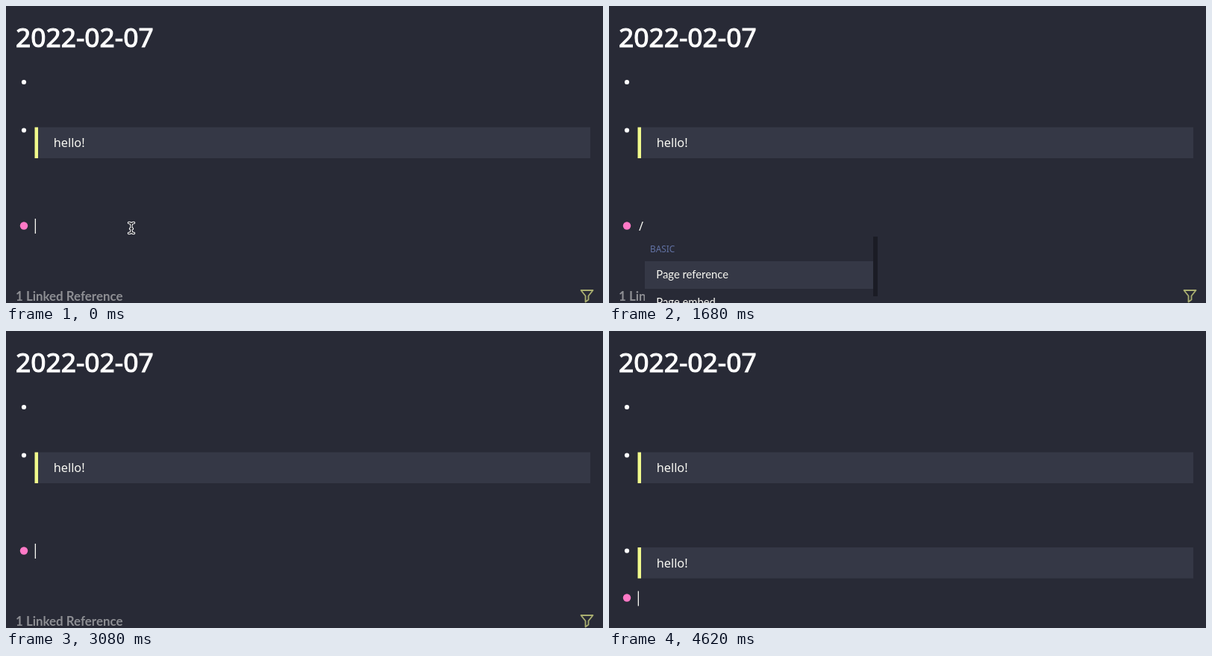
Recreate the animation shown at these times as an HTML page. Size 800 by 398 pixels, loop 4970 ms.

```html
<!DOCTYPE html>
<html lang="en">
<head>
<meta charset="utf-8">
<title>Slash command in an outliner</title>
<style>
html, body { margin: 0; width: 100%; height: 100%; overflow: hidden; background: #282a36; }
svg { display: block; width: 800px; height: 398px; }
text { font: 16.3px "Noto Sans", "Open Sans", sans-serif; fill: #f8f8f2; white-space: pre; }
.title { font-size: 35.4px; fill: #fff; stroke: #fff; stroke-width: 1.1; }
.ref { font: 700 16.9px Lato, sans-serif; fill: #8e8f94; }
.head { font-size: 11.8px; fill: #6272a4; }
.item { font: 14.8px Lato, sans-serif; }
.box { fill: #353846; }
.bullet { fill: #fff; }
</style>
</head>
<body>
<svg viewBox="0 0 800 398">
  <defs>
    <g id="quote">
      <rect class="box" x="39" y="162.500" width="744" height="41.500"/>
      <rect x="38.500" y="162.500" width="4.500" height="41.500" fill="#f1fa8c"/>
      <text x="63.700" y="189">hello!</text>
    </g>
    <path id="beam" d="M164.500 290.500q3.500 0 3.500 3v8q0 3-3.500 3M171.500 290.500q-3.500 0-3.500 3v8q0 3 3.500 3M166.500 298.500h3"/>
  </defs>
  <text class="title" x="13" y="54.700">2022-02-07</text>
  <circle class="bullet" cx="24" cy="102" r="3.1"/>
  <circle class="bullet" cx="24" cy="166.500" r="3.1"/>
  <use href="#quote"/>

  <g id="footer">
    <text class="ref" x="13" y="395">1 Linked Reference</text>
    <path d="M770.500 381h16l-6 7.500v5l-4 3v-8z" fill="none" stroke="#a9ae70" stroke-width="1.8" stroke-linejoin="round"/>
  </g>

  <g id="inserted">
    <use href="#quote" y="127.500"/>
    <circle id="left" class="bullet" cx="24" cy="294.500"/>
  </g>
  <circle id="active" cx="24" fill="#ff79c6"/>
  <text id="typed" x="40" y="301"></text>

  <g id="menu">
    <rect x="48" y="309" width="312" height="89" fill="#282a36"/>
    <rect class="box" x="48" y="342" width="306" height="37"/>
    <rect x="354" y="309" width="6" height="80" fill="#1b1c25"/>
    <text class="head" x="55" y="330">BASIC</text>
    <text class="item" x="63.300" y="365">Page reference</text>
    <text class="item" x="63.300" y="402">Page embed</text>
  </g>
  <rect id="caret" width="1.3" height="20" fill="#f8f8f2"/>
  <g id="mouse" fill="none" stroke-linecap="round">
    <use href="#beam" stroke="#fff" stroke-width="3.4"/>
    <use href="#beam" stroke="#15161d" stroke-width="1.3"/>
  </g>
</svg>
<script>
const LOOP = 4970, OPEN = 1050, TYPE_J = 2240, MOVE = 2310, RUN = 3080, PASTE = 3150, ENTER = 3500;
const $ = id => document.getElementById(id);
const show = (id, on) => $(id).setAttribute('visibility', on ? 'visible' : 'hidden');
const within = (t, a, b) => t >= a && t < b;
const caretOff = [[420, 910], [1610, 2100], [2730, RUN], [4060, 4620]];

function draw(t) {
  const entered = t >= ENTER;
  show('mouse', t < OPEN);
  show('menu', within(t, OPEN, RUN));
  show('footer', t < PASTE);
  show('inserted', entered);
  $('menu').setAttribute('transform', `translate(${t < MOVE ? 0 : -8.5} 0)`);

  const text = within(t, OPEN, RUN) ? (t < TYPE_J ? '/' : '/j')
    : within(t, PASTE, ENTER) ? '> hello!' : '';
  $('typed').textContent = text;

  // Focus passes from the finished block to the new one
  const k = entered ? Math.min(1, (t - ENTER) / 210) : 1;
  $('left').setAttribute('r', 4.1 - k);
  $('active').setAttribute('r', 4.5 + 0.7 * k);
  $('active').setAttribute('cy', entered ? 357.5 : 294.5);

  const x = text ? 41.5 + $('typed').getComputedTextLength() : 38.7;
  $('caret').setAttribute('x', x);
  $('caret').setAttribute('y', entered ? 348.5 : 285);
  show('caret', !caretOff.some(([a, b]) => within(t, a, b)));
}

const start = performance.now();
function tick() {
  draw((performance.now() - start) % LOOP);
  requestAnimationFrame(tick);
}
tick();
</script>
</body>
</html>
```
